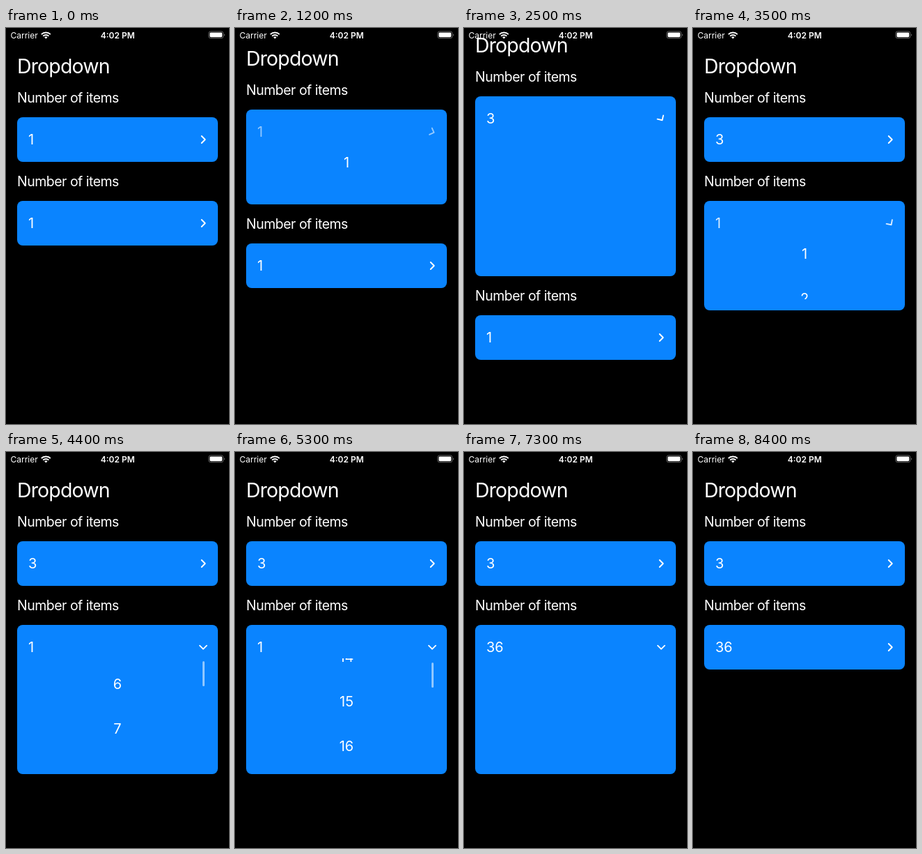
An HTML page that plays this animation: 320 px wide and 568 px high, repeating every 8500 ms.

```html
<!DOCTYPE html>
<html lang="en">
<head>
<meta charset="utf-8">
<title>Dropdown</title>
<style>
  html, body { margin: 0; width: 100%; height: 100%; overflow: hidden; background: #000; }
  svg { display: block; width: 320px; height: 568px; }
  text { font-family: Inter, Roboto, "Liberation Sans", sans-serif; font-size: 20px; fill: #fff; }
  .title { font-size: 28.5px; letter-spacing: -.03em; }
  .label { font-size: 19.5px; letter-spacing: -.026em; }
  .status text { font-size: 12px; }
  .status .clock { font-weight: 600; text-anchor: middle; }
  .item { text-anchor: middle; }
  .card { fill: #0a84ff; }
  .line { fill: none; stroke: #fff; stroke-width: 1.9; stroke-linecap: round; stroke-linejoin: round; }
</style>
</head>
<body>
<svg viewBox="0 0 320 568">
  <g id="page">
    <text class="title" x="16" y="64.6">Dropdown</text>
  </g>
  <g class="status">
    <text x="6.5" y="14.5">Carrier</text>
    <g fill="none" stroke="#fff" stroke-width="2">
      <path d="M50.8 9.1A9.2 9.2 0 0 1 63.8 9.1"/>
      <path d="M53.2 11.6A5.8 5.8 0 0 1 61.4 11.6"/>
    </g>
    <path d="M57.3 15.6L55.1 13.3A3.2 3.2 0 0 1 59.5 13.3Z" fill="#fff"/>
    <text class="clock" x="160.3" y="14.5">4:02 PM</text>
    <rect x="290.9" y="4.9" width="20.8" height="9.8" rx="2.6" fill="none" stroke="#666"/>
    <rect x="292.4" y="6.4" width="17.8" height="6.8" rx="1.4" fill="#fff"/>
    <path d="M313 8.2a1.8 1.8 0 0 1 0 3.4z" fill="#666"/>
  </g>
</svg>
<script>
const NS = "http://www.w3.org/2000/svg";
const LOOP = 8500, STEP = 100, SLIDE = 350;
const ROW = 64, HEAD = 48, CLOSED = 64;
const page = document.getElementById("page");

function add(parent, tag, attrs, text) {
  const el = document.createElementNS(NS, tag);
  for (const k in attrs) el.setAttribute(k, attrs[k]);
  if (text !== undefined) el.textContent = text;
  return parent.appendChild(el);
}

const clamp = v => Math.min(1, Math.max(0, v));
const ramp = (t, start, length) => clamp((t - start) / length);
const ease = u => (1 - Math.cos(Math.PI * u)) / 2;
const fling = u => 1 - (1 - u ** 1.5) ** 2;

function makeDropdown(id, top, rows, opts) {
  const group = add(page, "g", { transform: `translate(0 ${top})` });
  add(group, "text", { class: "label", x: 16, y: -21 }, "Number of items");
  const card = add(group, "rect", { class: "card", x: 16, y: 0, width: 288, height: CLOSED, rx: 8 });
  const head = add(group, "g", {});
  const value = add(head, "text", { x: 32, y: 39 });
  const arrow = add(head, "path", { class: "line", d: "M-2.3 -5L2.7 0L-2.3 5" });

  const clip = add(add(group, "clipPath", { id }), "rect", { x: 16, y: HEAD, width: 288, height: 0 });
  const list = add(group, "g", { "clip-path": `url(#${id})` });
  const items = add(list, "g", {});
  for (let n = 1; n <= rows; n++)
    add(items, "text", { class: "item", x: 160, y: HEAD + 35 + ROW * (n - 1) }, n);
  const bar = add(list, "rect", { x: 282, width: 3, height: 36, rx: 1.5, fill: "#fff", opacity: 0 });
  return { group, card, head, value, arrow, clip, list, items, bar, top, ...opts };
}

const first = makeDropdown("clipA", 128, 3,
  { open: 1086, pick: 2300, close: 2358, size: 300, choice: 3 });
const second = makeDropdown("clipB", 248, 40,
  { open: 3298, pick: 7300, close: 7360, size: 150, choice: 36 });

// Draws one dropdown and returns how far its list is extended.
function drawDropdown(d, t) {
  const p = ease(ramp(t, d.open, SLIDE)) - ease(ramp(t, d.close, SLIDE));
  const extent = Math.round(d.size * p);
  const alpha = 1 - .8 * ramp(t, d.open - 190, 140) + .8 * ramp(t, d.open, 250);
  d.card.setAttribute("height", CLOSED + extent);
  d.clip.setAttribute("height", extent);
  d.head.setAttribute("opacity", alpha);
  d.value.textContent = t < d.pick ? 1 : d.choice;
  d.arrow.setAttribute("transform", `translate(283 32) rotate(${90 * p})`);
  d.list.style.display = p > 0 && t < d.pick ? "" : "none";
  return extent;
}

function drawScroll(d, t) {
  const y = 500 * fling(ramp(t, 3950, 850))
          + 622 * fling(ramp(t, 4850, 900))
          + 1060 * fling(ramp(t, 5750, 600));
  d.items.setAttribute("transform", `translate(0 ${-y})`);
  d.bar.setAttribute("y", HEAD + 3 + y * .0034);
  d.bar.setAttribute("opacity", .55 * (ramp(t, 3950, 100) - ramp(t, 6300, 200)));
}

function draw(now) {
  const t = Math.floor((now % LOOP) / STEP) * STEP;
  const extent = drawDropdown(first, t);
  drawDropdown(second, t);
  drawScroll(second, t);
  page.setAttribute("transform", `translate(0 ${-Math.round(.154 * extent)})`);
  second.group.setAttribute("transform", `translate(0 ${second.top + extent})`);
}

function tick() {
  draw(performance.now());
  requestAnimationFrame(tick);
}
tick();
</script>
</body>
</html>
```
